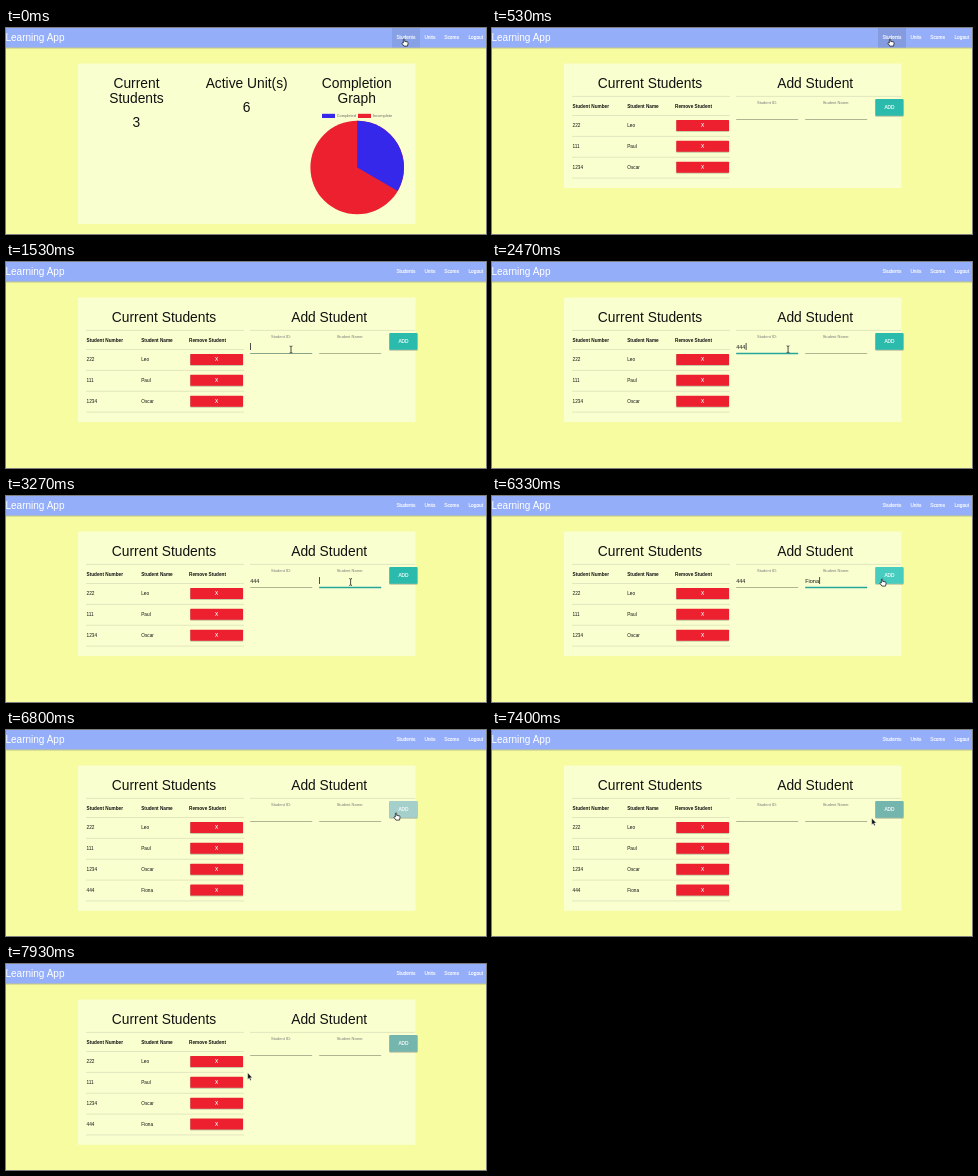
An HTML page for the animation above (8 s loop, 480x206 px).

```html
<!DOCTYPE html>
<html lang="en">
<head>
<meta charset="utf-8">
<title>Learning App</title>
<style>
html, body { margin: 0; width: 100%; height: 100%; overflow: hidden; background: #f6fc9f; }
svg { display: block; width: 100%; height: 100%; }
text { font-family: "Liberation Sans", Arial, sans-serif; fill: #111; white-space: pre; }
.title { font-size: 13.8px; text-anchor: middle; }
.nav { font-size: 4.8px; fill: #fff; stroke: #fff; stroke-width: .12px; }
.cell { font-size: 4.75px; }
.head { font-size: 4.7px; font-weight: bold; }
.label { font-size: 4px; fill: #777; text-anchor: middle; }
.legend { font-size: 4px; fill: #666; }
.button { font-size: 4.8px; fill: #fff; text-anchor: middle; stroke: #fff; stroke-width: .12px; }
.input { font-size: 5.5px; }
.rule { stroke: #d9ddb7; stroke-width: .7; }
.shadow { fill: #000; opacity: .14; }
</style>
</head>
<body>
<svg id="stage" viewBox="0 0 480 206" xmlns="http://www.w3.org/2000/svg"></svg>
<script>
const LOOP = 8000;
const stage = document.getElementById("stage");

const text = (cls, x, y, s, id = "") => `<text class="${cls}" x="${x}" y="${y}" id="${id}">${s}</text>`;
const rect = (x, y, w, h, fill, more = "") =>
  `<rect x="${x}" y="${y}" width="${w}" height="${h}" fill="${fill}" ${more}/>`;
const rule = (x1, x2, y) => `<path class="rule" d="M${x1} ${y}H${x2}"/>`;
const shadow = (x, y, w, h) =>
  rect(x - .4, y + .5, w + .8, h + .5, "#000", 'class="shadow" rx="1"') +
  rect(x, y + .5, w, h + .1, "#000", 'class="shadow" rx=".8"');

function header() {
  const links = [["Students", 390.4], ["Units", 418.4], ["Scores", 438.2], ["Logout", 462.4]];
  return rect(0, 19, 480, 2.6, "url(#fade)") +
    rect(0, 0, 480, 19.5, "#95aefa") +
    rect(386, 0, 28, 19.5, "#859bdf", 'id="hover"') +
    '<text x="-.5" y="12.8" font-size="10" style="fill:#fff">Learning App</text>' +
    links.map(([s, x]) => text("nav", x, 11, s)).join("");
}

function dashboard() {
  return text("title", 130.5, 60, "Current") + text("title", 130.5, 75, "Students") +
    text("title", 130.3, 99, "3") +
    text("title", 240.7, 60, "Active Unit(s)") + text("title", 240.5, 84, "6") +
    text("title", 350.7, 60, "Completion") + text("title", 350.7, 75, "Graph") +
    rect(316, 85.8, 13, 4.2, "#3528eb") + text("legend", 330.7, 89.4, "Completed") +
    rect(352, 85.8, 13, 4.2, "#ed2030") + text("legend", 366.7, 89.4, "Incomplete") +
    '<circle cx="351.2" cy="139.5" r="46.8" fill="#ed2030"/>' +
    '<path d="M351.2 139.5V92.7A46.8 46.8 0 0 1 391.73 162.9Z" fill="#3528eb"/>';
}

function row([number, name], i) {
  const y = 92 + i * 20.85;
  return `<g id="row${i}">` + text("cell", 80.5, y + 7, number) + text("cell", 135.2, y + 7, name) +
    shadow(184.3, y, 52.7, 11) + rect(184.3, y, 52.7, 11, "#ed2030", 'rx=".6"') +
    text("button", 210.6, y + 7.1, "X") + rule(80, 238, y + 16.4) + "</g>";
}

const field = (id, x, label, cx) =>
  text("label", cx, 75.8, label) +
  `<path id="${id}Line" d="M${x} 91.5H${x + 62}"/>` +
  text("input", x, 86.6, "", id) +
  rect(x, 81, .8, 7, "#222", `id="${id}Caret"`);

function students() {
  const rows = [["222", "Leo"], ["111", "Paul"], ["1234", "Oscar"], ["444", "Fiona"]];
  return text("title", 158, 60, "Current Students") + text("title", 323.2, 60, "Add Student") +
    rule(80, 238, 68.4) + rule(244, 409, 68.4) +
    text("head", 80.5, 80.2, "Student Number") + text("head", 135.2, 80.2, "Student Name") +
    text("head", 183, 80.2, "Remove Student") + rule(80, 238, 87.5) +
    rows.map(row).join("") +
    field("ident", 244.2, "Student ID:", 275) + field("name", 313.2, "Student Name:", 344) +
    shadow(383.4, 71, 28, 16.8) + rect(383.4, 71, 28, 16.8, "#2bbbad", 'id="add" rx=".7"') +
    '<circle id="ripple" cx="391" cy="85" fill="#fff" clip-path="url(#addClip)"/>' +
    text("button", 397.5, 81.1, "ADD");
}

const cursors = `
  <path id="arrow" d="M0 0V6.6L1.5 5.3L2.5 7.6L3.6 7.1L2.6 4.9H4.6Z" fill="#111" stroke="#fff" stroke-width=".4"/>
  <path id="beam" d="M-1.4 -3.4Q0 -3.4 0 -2.6Q0 -3.4 1.4 -3.4M0 -2.6V2.6M-1.4 3.4Q0 3.4 0 2.6Q0 3.4 1.4 3.4" fill="none" stroke="#222" stroke-width=".8"/>
  <path id="hand" d="M-1.6 -3.4Q-.8 -4.2 -.3 -3.2V-1.1L2.4 -.6Q3.2 -.3 3.1 .7L2.5 3.6H-1.1L-3.1 .8Q-3 -.1 -1.7 .5Z" fill="#fff" stroke="#222" stroke-width=".8"/>`;

stage.innerHTML = `
  <defs>
    <linearGradient id="fade" x2="0" y2="1"><stop stop-color="#8d9468" stop-opacity=".6"/><stop offset="1" stop-color="#8d9468" stop-opacity="0"/></linearGradient>
    <clipPath id="addClip">${rect(383.4, 71, 28, 16.8, "#000")}</clipPath>
  </defs>
  ${rect(0, 0, 480, 206, "#f6fc9f")}
  ${rect(72, 35.5, 337.5, 160, "#faffcf", 'id="panel"')}
  ${header()}
  <g id="dashboard">${dashboard()}</g>
  <g id="students">${students()}</g>
  <g id="cursor">${cursors}</g>`;

const el = id => document.getElementById(id);
const set = (id, attrs) => { for (const k in attrs) el(id).setAttribute(k, attrs[k]); };
const show = (id, on) => el(id).setAttribute("display", on ? "inline" : "none");
const within = (t, a, b) => t >= a && t < b;
const ramp = (t, a, b) => Math.min(1, Math.max(0, (t - a) / (b - a)));
const ease = p => p * p * (3 - 2 * p);
const mix = (a, b, p) => "rgb(" + a.map((v, i) => Math.round(v + (b[i] - v) * p)) + ")";

// time, x, y of the pointer
const path = [[0, 399, 14.5], [530, 399, 14.5], [670, 372, 29], [800, 372, 29], [1130, 285, 87.5],
  [2270, 285, 87.5], [3000, 344.6, 86], [5800, 344.6, 86], [6330, 391, 86.5],
  [7300, 391, 86.5], [7900, 241.7, 108.8]];

function pointer(t) {
  const i = path.findIndex(p => p[0] > t);
  if (i < 0) return path[path.length - 1].slice(1);
  const [a, b] = [path[i - 1], path[i]];
  const p = ease(ramp(t, a[0], b[0]));
  return [a[1] + (b[1] - a[1]) * p, a[2] + (b[2] - a[2]) * p];
}

function typed(word, times, t) {
  return word.slice(0, times.filter(at => t >= at).length);
}

function drawField(id, x, value, focus, caret) {
  el(id).textContent = value;
  set(id + "Line", {
    stroke: mix([145, 148, 120], [38, 166, 154], focus),
    "stroke-width": .7 + focus * .7
  });
  show(id + "Caret", caret);
  if (caret) set(id + "Caret", { x: x + (value ? el(id).getComputedTextLength() + .3 : 0) });
}

function drawCursor(t) {
  const [x, y] = pointer(t);
  const overAdd = x > 383 && x < 411.5 && y > 71 && y < 88;
  const overField = y > 79 && y < 92 && (within(x, 244, 306.5) || within(x, 313, 375.5)) && t < 7000;
  const kind = t < 600 || overAdd ? "hand" : overField ? "beam" : "arrow";
  for (const id of ["hand", "beam", "arrow"]) show(id, id === kind);
  show("cursor", !within(t, 1870, 2270) && !within(t, 3530, 5800));
  set("cursor", { transform: `translate(${x.toFixed(2)} ${y.toFixed(2)})` });
  return overAdd;
}

function drawAdd(t, over) {
  const pressed = ramp(t, 6470, 6650);
  const base = [43, 187, 173], light = [70, 205, 192], focus = [116, 181, 174];
  set("add", { fill: t < 6470 ? mix(base, light, over ? 1 : 0) : mix(light, focus, pressed) });
  set("ripple", {
    r: 30 * ease(ramp(t, 6470, 6720)),
    opacity: t < 6470 ? 0 : .35 * (1 - ramp(t, 6850, 7200))
  });
}

function render(t) {
  const home = t < 530, added = t >= 6530;
  show("dashboard", home);
  show("students", !home);
  show("row3", added);
  set("panel", { height: home ? 160.5 : added ? 145.3 : 124.5 });
  set("hover", { opacity: (.75 + .25 * ramp(t, 40, 130)) * (1 - ramp(t, 640, 900)) });

  const idFocus = ramp(t, 1470, 1730) * (1 - ramp(t, 3100, 3270));
  const nameFocus = ramp(t, 3100, 3270) * (1 - ramp(t, 6470, 6700));
  const idCaret = within(t, 1530, 2600) || within(t, 2900, 3130);
  const nameCaret = within(t, 3130, 4600) || within(t, 5330, 5800) || within(t, 6200, 6470);
  drawField("ident", 244.2, added ? "" : typed("444", [1870, 2000, 2130], t), idFocus, idCaret);
  drawField("name", 313.2, added ? "" : typed("Fiona", [3600, 3870, 4270, 5070, 5270], t), nameFocus, nameCaret);
  drawAdd(t, drawCursor(t));
}

const start = performance.now();
function tick() {
  render((performance.now() - start) % LOOP);
  requestAnimationFrame(tick);
}
tick();
</script>
</body>
</html>
```
